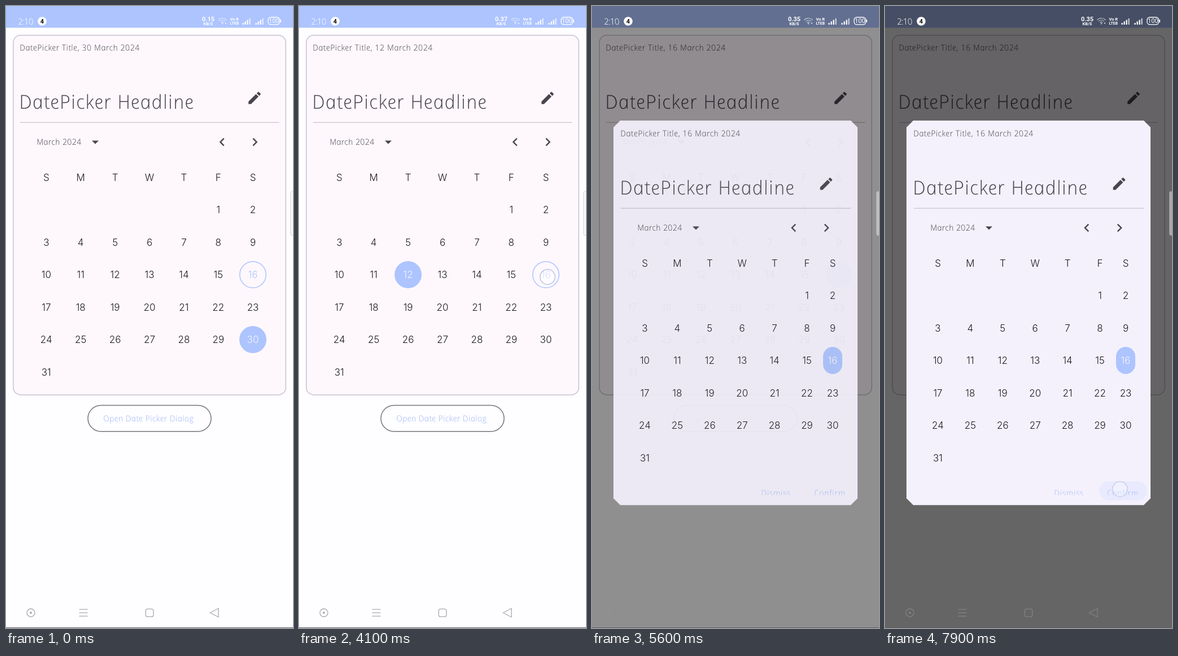
These frames come from a looping animation (508x1102 px, 8000 ms). An HTML page with a canvas:

```html
<!DOCTYPE html>
<html lang="en">
<head>
<meta charset="utf-8">
<title>Date picker</title>
<style>
html, body { margin: 0; width: 100%; height: 100%; overflow: hidden; background: #fefdff; }
canvas { display: block; width: 100vw; height: 100vh; }
</style>
</head>
<body>
<canvas id="stage" width="508" height="1102"></canvas>
<script>
const W = 508, H = 1102, LOOP = 8000, STEP = 100;
const screen = document.getElementById('stage').getContext('2d');
const layer = Object.assign(document.createElement('canvas'), { width: W, height: H });
const dialog = layer.getContext('2d');

const BLUE = '#adc4fe', INK = '#1c1b1f', SOFT = '#49454f', RULE = '#c8c4cd';
const HAND = '"Open Sans", sans-serif', STATUS = 'Roboto, sans-serif';
const DIGITS = '350 17px Inter, sans-serif';
const ICON = {
  edit: new Path2D('M3 17.25V21h3.75L17.81 9.94l-3.75-3.75L3 17.25zM20.71 7.04c.39-.39.39-1.02 0-1.41l-2.34-2.34c-.39-.39-1.02-.39-1.41 0l-1.83 1.83 3.75 3.75 1.83-1.83z'),
  prev: new Path2D('M15.41 16.59L10.83 12l4.58-4.59L14 6l-6 6 6 6z'),
  next: new Path2D('M8.59 16.59L13.17 12 8.59 7.41 10 6l6 6-6 6z'),
  drop: new Path2D('M7 10l5 5 5-5z')
};

// Each pick: start time, day, length of the press tint
const PICKS = [[-1000, 30, 0], [1600, 16, 100], [3000, 15, 300], [3600, 12, 300], [4200, 16, 200]];
// Each tap: from, to, x, y and an optional end point with travel time
const TAPS = [
  [1400, 1700, 440.5, 483],
  [2800, 3000, 374, 471.5],
  [3000, 3700, 374, 471.5, 194, 489, 400],
  [4100, 4300, 440, 480],
  [5000, 5200, 260, 725],
  [6500, 6900, 426, 630.5],
  [7700, 8000, 416, 856]
];

const clamp = v => Math.max(0, Math.min(1, v));
const ramp = (t, from, to) => clamp((t - from) / (to - from));

function box(g, x, y, w, h, r) {
  g.beginPath();
  g.roundRect(x, y, w, h, r);
}

function disc(g, x, y, r) {
  g.beginPath();
  g.arc(x, y, r, 0, 2 * Math.PI);
}

function line(g, x1, y1, x2, y2) {
  g.beginPath();
  g.moveTo(x1, y1);
  g.lineTo(x2, y2);
  g.stroke();
}

function icon(g, name, x, y) {
  g.save();
  g.translate(x, y);
  g.scale(1.2, 1.2);
  g.translate(-12, -12);
  g.fillStyle = SOFT;
  g.fill(ICON[name]);
  g.restore();
}

function text(g, str, x, y, font, color, align = 'center') {
  g.font = font;
  g.fillStyle = color;
  g.textAlign = align;
  g.fillText(str, x, y);
}

// Upright cursive: light italic letters sheared back to vertical
function hand(g, str, x, y, size, color, gap) {
  g.save();
  g.transform(1, 0, 0.21, 1, x, y);
  g.letterSpacing = gap + 'px';
  text(g, str, 0, 0, `italic 300 ${size}px ${HAND}`, color, 'left');
  g.restore();
}

function picked(t) {
  const i = PICKS.findLastIndex(p => t >= p[0]);
  const [start, day, press] = PICKS[i];
  return {
    day,
    last: i ? PICKS[i - 1][1] : day,
    mix: clamp((t - start + 50) / 150),
    press: t < start + press
  };
}

function dayCell(g, day, x, y, w, s) {
  const on = day === s.day ? s.mix : day === s.last ? 1 - s.mix : 0;
  const today = day === 16;
  if (today && on < 1) {
    box(g, x - w / 2 + .75, y - 23.25, w - 1.5, 46.5, w / 2 - .75);
    g.strokeStyle = BLUE;
    g.lineWidth = 1.5;
    g.stroke();
  }
  if (on > 0) {
    g.save();
    g.globalAlpha *= on;
    box(g, x - w / 2, y - 24, w, 48, w / 2);
    g.fillStyle = s.press && day === s.day ? '#a0b4e8' : BLUE;
    g.fill();
    g.restore();
  }
  const color = on > .4 ? '#f6f5ff' : today ? BLUE : INK;
  text(g, day, x, y + 6.2, DIGITS, color);
}

function picker(g, s, p) {
  const { left, right, top } = p;
  hand(g, `DatePicker Title, ${s.day} March 2024`, left, top + 79, 14.7, SOFT, 0.5);
  hand(g, 'DatePicker Headline', left, top + 182, 34, SOFT, 1.25);
  icon(g, 'edit', right - 43.5, top + 163);
  g.strokeStyle = RULE;
  g.lineWidth = 1.4;
  line(g, left, top + 206.4, right, top + 206.4);
  hand(g, 'March 2024', left + 30, top + 246, 14.7, SOFT, 0.35);
  icon(g, 'drop', left + 133, top + 241);
  icon(g, 'prev', right - 101, top + 241);
  icon(g, 'next', right - 43, top + 241);

  const colX = c => c === 6 ? p.lastX : p.firstX + c * p.step;
  [...'SMTWTFS'].forEach((d, c) => text(g, d, colX(c), top + 310.2, DIGITS, INK));
  for (let day = 1; day <= 31; day++) {
    const slot = day + 4, c = slot % 7;
    dayCell(g, day, colX(c), top + 361 + 57.5 * Math.floor(slot / 7), c === 6 ? p.lastW : 48, s);
  }
}

function page(g, t, s) {
  g.fillStyle = '#fefdff';
  g.fillRect(0, 0, W, H);
  g.fillStyle = BLUE;
  g.fillRect(0, 0, W, 38.5);

  box(g, 13, 51.7, 482.2, 637.2, 13);
  g.fillStyle = '#fef8fd';
  g.fill();
  g.strokeStyle = '#c6c2d0';
  g.lineWidth = 1.5;
  g.stroke();
  picker(g, s, { left: 25, right: 483.5, top: 0, firstX: 71.3, step: 60.9, lastX: 437, lastW: 48 });

  const press = ramp(t, 4900, 5300);
  box(g, 145, 707.5, 218, 46.3, 23.1);
  g.fillStyle = `rgba(173,196,254,${0.09 * press})`;
  g.fill();
  g.strokeStyle = '#77757c';
  g.lineWidth = 1.5;
  g.stroke();
  const mix = (a, b) => Math.round(a + (b - a) * press);
  hand(g, 'Open Date Picker Dialog', 173, 735.5, 14.7,
    `rgb(${mix(158, 176)},${mix(184, 178)},${mix(248, 186)})`, 0.42);
}

function drawDialog(g, t, s) {
  g.clearRect(0, 0, W, H);
  const x1 = 38, y1 = 203, x2 = 470, y2 = 884.3, cut = 12;
  g.beginPath();
  g.moveTo(x1 + cut, y1);
  g.lineTo(x2 - cut, y1);
  g.lineTo(x2, y1 + cut);
  g.lineTo(x2, y2 - cut);
  g.lineTo(x2 - cut, y2);
  g.lineTo(x1 + cut, y2);
  g.lineTo(x1, y2 - cut);
  g.lineTo(x1, y1 + cut);
  g.closePath();
  g.fillStyle = '#f4f1fd';
  g.fill();
  picker(g, s, { left: 51, right: 458, top: 152, firstX: 93.5, step: 57.4, lastX: 426, lastW: 34 });

  const press = ramp(t, 7600, 7900);
  box(g, 379, 842, 85, 34, 17);
  g.fillStyle = `rgba(173,196,254,${0.16 * press})`;
  g.fill();
  g.save();
  g.beginPath();
  g.rect(x1, 840, x2 - x1, 26.6);
  g.clip();
  hand(g, 'Dismiss', 300, 867.5, 14.7, '#a2bbf8', 0.8);
  hand(g, 'Confirm', 394, 867.5, 14.7, '#a2bbf8', 0.8);
  g.restore();
}

function statusBar(g, t) {
  g.fillStyle = g.strokeStyle = '#fff';
  hand(g, '2:10', 22, 32.5, 15.5, '#fff', -0.7);
  disc(g, 64, 27, 7.8);
  g.fill();
  text(g, '4', 64, 31, `700 11px ${STATUS}`, '#111');

  const speed = t < 1200 ? '0.15' : t < 5000 ? '0.37' : '0.35';
  text(g, speed, 358, 27, `700 11px ${STATUS}`, '#fff');
  text(g, 'KB/S', 358, 34.2, `700 7.5px ${STATUS}`, '#fff');

  g.save();
  g.globalAlpha = 0.65;
  g.lineWidth = 1.2;
  for (const r of [3, 6.5, 10]) {
    g.beginPath();
    g.arc(383, 31.5, r, -Math.PI * .77, -Math.PI * .23);
    g.stroke();
  }
  disc(g, 383, 31.3, 1.2);
  g.fill();
  disc(g, 389, 30.5, 1.3);
  g.fill();
  g.restore();

  text(g, 'Vo R', 404.3, 26, `700 7.5px ${STATUS}`, '#fff');
  text(g, 'LTEB', 404.3, 33, `700 6.8px ${STATUS}`, '#fff');
  for (const x of [418.5, 441.5]) {
    for (let i = 0; i < 4; i++) {
      const h = 3 + i * 2.7;
      g.globalAlpha = i < 3 ? 1 : 0.7;
      g.fillRect(x + i * 4, 33 - h, 2.2, h);
    }
  }
  g.globalAlpha = 1;
  box(g, 464, 20, 20.5, 12.8, 4.5);
  g.lineWidth = 1.3;
  g.stroke();
  g.fillRect(485.5, 24, 1.5, 5);
  text(g, '100', 474.3, 30.4, `400 11px ${STATUS}`, '#fff');
}

function navBar(g) {
  g.strokeStyle = g.fillStyle = 'rgba(140,140,143,.75)';
  g.lineWidth = 1.3;
  disc(g, 44, 1075, 7);
  g.stroke();
  disc(g, 44, 1075, 1.9);
  g.fill();
  for (const y of [1069, 1075, 1081]) line(g, 129.5, y, 144.5, y);
  box(g, 247.3, 1068.3, 13.6, 13.6, 3);
  g.stroke();
  g.beginPath();
  g.moveTo(361.5, 1075);
  g.lineTo(376, 1067.3);
  g.lineTo(376, 1082.7);
  g.closePath();
  g.stroke();
  g.fillStyle = '#5c5b5e';
  g.fillRect(0, H - 1, W, 1);
}

function edgeHandle(g) {
  box(g, 503.5, 328.5, 8, 78, 3);
  g.fillStyle = 'rgba(240,240,242,.5)';
  g.fill();
  g.strokeStyle = 'rgba(180,180,184,.5)';
  g.lineWidth = 1;
  g.stroke();
}

function touch(g, t) {
  for (const [from, to, x, y, endX = x, endY = y, time = 1] of TAPS) {
    if (t < from || t >= to) continue;
    const k = clamp((t - from) / time);
    g.save();
    g.globalAlpha = clamp((to - t) / 150);
    // fast sideways at first, dipping near the end
    const across = k * (1.22 - 0.22 * k);
    disc(g, x + (endX - x) * across, y + (endY - y) * k * k, 13.3);
    g.fillStyle = 'rgba(255,255,255,.5)';
    g.fill();
    g.strokeStyle = 'rgba(176,188,222,.75)';
    g.lineWidth = 1.8;
    g.stroke();
    g.restore();
  }
}

function draw(t) {
  const s = picked(t);
  page(screen, t, s);
  if (t >= 5500) {
    screen.fillStyle = `rgba(0,0,0,${0.27 + 0.33 * ramp(t, 5500, 5700)})`;
    screen.fillRect(0, 0, W, H);
    drawDialog(dialog, t, s);
    screen.globalAlpha = 0.85 + 0.15 * ramp(t, 5500, 5700);
    screen.drawImage(layer, 0, 0);
    screen.globalAlpha = 1;
  }
  statusBar(screen, t);
  navBar(screen);
  edgeHandle(screen);
  touch(screen, t);
}

const start = performance.now();
function tick() {
  const t = (performance.now() - start) % LOOP;
  draw(Math.floor(t / STEP) * STEP);
  requestAnimationFrame(tick);
}
tick();
</script>
</body>
</html>
```
